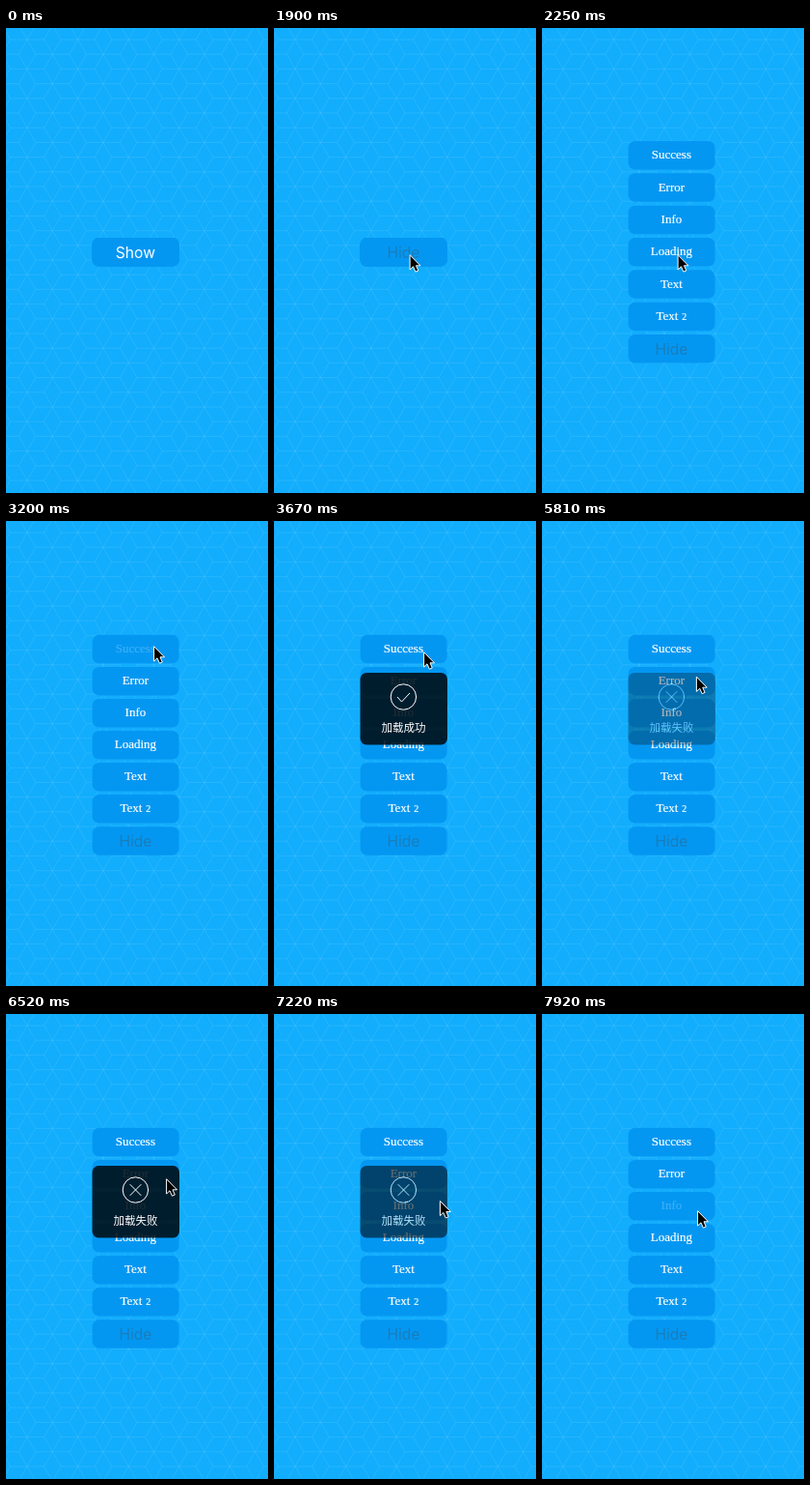
These frames come from a looping animation (272x481 px, 8000 ms). An HTML page:

```html
<!DOCTYPE html>
<html lang="en">
<head>
<meta charset="utf-8">
<title>Popup menu</title>
<style>
  html, body { margin: 0; width: 100%; height: 100%; overflow: hidden; background: #12adfd; }
  svg { display: block; width: 100%; height: 100%; }
  text { text-anchor: middle; fill: #fff; }
  .item { font: 13px "Liberation Serif", serif; stroke: #fff; stroke-width: 0.2; }
  .main { font: 15.6px Inter, sans-serif; }
  .note { font: 11.5px "Noto Sans CJK SC", "Noto Sans CJK", sans-serif; }
  .line { fill: none; stroke: #fff; stroke-width: 1; }
</style>
</head>
<body>
<svg id="stage" viewBox="0 0 272 481" xmlns="http://www.w3.org/2000/svg"></svg>
<script>
// Times are in seconds; the picture advances in even beats after a still opening.
const LOOP = 8, OPENING = 0.95, BEAT = 0.1181;
const PITCH = 33.05, TOP = 217, MID = 134.4, FADE = 0.35;
const stage = document.getElementById('stage');

function add(parent, tag, attrs, text) {
  const el = document.createElementNS('http://www.w3.org/2000/svg', tag);
  for (const key in attrs) el.setAttribute(key, attrs[key]);
  if (text) el.textContent = text;
  parent.append(el);
  return el;
}

// Six-ray stars on a staggered grid form the rhombus pattern.
function drawPattern() {
  const side = 17.53, row = 15.2;
  let d = '';
  for (let j = -2; j < 33; j++) {
    const shift = j % 2 ? 48.3 : 22;
    for (let k = -1; k < 6; k++) {
      const x = shift + k * side * 3, y = 12 + j * row;
      d += `M${x - side} ${y}h${2 * side}`;
      d += `M${x - side / 2} ${y - row}l${side} ${2 * row}`;
      d += `M${x + side / 2} ${y - row}l${-side} ${2 * row}`;
    }
  }
  add(stage, 'path', { d, fill: 'none', stroke: '#fff', 'stroke-opacity': 0.1, 'stroke-width': 0.9 });
}

function makeButton(name, kind) {
  const g = add(stage, 'g', {});
  add(g, 'rect', { x: 89.6, y: TOP, width: 90, height: 29.5, rx: 7, fill: '#0497f2' });
  const label = add(g, 'text', { x: MID, y: kind === 'main' ? 238 : 235.3, class: kind }, name);
  return { g, label };
}

function makeHud(message, icon, from, to) {
  const g = add(stage, 'g', {});
  add(g, 'rect', { x: 89.5, y: 157, width: 90.5, height: 74.5, rx: 6.5, fill: '#000d14', 'fill-opacity': 0.88 });
  add(g, 'circle', { cx: MID, cy: 182, r: 13.2, class: 'line' });
  add(g, 'path', { d: icon, class: 'line' });
  add(g, 'text', { x: MID, y: 218, class: 'note' }, message);
  return { g, from, to };
}

drawPattern();
const items = ['Success', 'Error', 'Info', 'Loading', 'Text', 'Text'].map(name => makeButton(name, 'item'));
// Old-style figure: a small digit at x-height.
add(items[5].label, 'tspan', { dx: 4, 'font-size': 10 }, '2');
const main = makeButton('Show', 'main');
const huds = [
  makeHud('加载成功', 'M128 182l4.5 5 8.5-9', 3.32, 4.63),
  makeHud('加载失败', 'M128.7 176.2l11.6 11.6m0-11.6l-11.6 11.6', 5.68, 7.11)
];
const cursor = add(stage, 'path', {
  d: 'M.6.7V16L4 12.8 6.4 18.2 9.3 17 7 11.8H11.5Z',
  fill: '#000', stroke: '#fff', 'stroke-width': 1, 'stroke-linejoin': 'round'
});

const entry = { x: 35, y: 242 };
const moves = [
  { from: 0.96, to: 1.67, x: 140.5, y: 234 },
  { from: 2.5, to: 3.2, x: 153, y: 129 },
  { from: 3.32, to: 3.56, x: 155, y: 135 },
  { from: 5.25, to: 6.03, x: 161, y: 167 },
  { from: 6.15, to: 6.5, x: 166, y: 170 },
  { from: 6.63, to: 6.98, x: 167, y: 190 },
  { from: 7.1, to: 7.45, x: 185, y: 200 },
  { from: 7.45, to: 7.9, x: 161, y: 203 }
];
const presses = [
  { button: main, from: 1.75, to: 1.85 },
  { button: items[0], from: 3.15, to: 3.4 },
  { button: items[1], from: 5.5, to: 5.75 },
  { button: items[2], from: 7.9, to: LOOP }
];

const ramp = (t, from, to) => Math.min(1, Math.max(0, (t - from) / (to - from)));
const smooth = u => u * u * (3 - 2 * u);

// Underdamped spring with a slight overshoot.
function spring(s) {
  return s <= 0 ? 0 : 1 - Math.exp(-7 * s) * (Math.cos(6.9 * s) + Math.sin(6.9 * s));
}

function pointer(t) {
  return moves.reduce((p, m) => {
    const u = smooth(ramp(t, m.from, m.to));
    return { x: p.x + (m.x - p.x) * u, y: p.y + (m.y - p.y) * u };
  }, entry);
}

function draw(time) {
  const beat = Math.floor((time % LOOP - OPENING) / BEAT);
  const t = 0.96 + beat * BEAT;

  const open = spring(t - 1.906);
  items.forEach((b, i) => b.g.setAttribute('transform', `translate(0 ${(i - 3) * PITCH * open})`));
  main.g.setAttribute('transform', `translate(0 ${3 * PITCH * open})`);

  const shown = t > 1.85;
  main.label.textContent = shown ? 'Hide' : 'Show';
  main.label.style.fill = shown ? '#1b7db8' : '#fff';

  for (const p of presses) p.button.label.setAttribute('opacity', t >= p.from && t < p.to ? 0.22 : 1);
  for (const h of huds) {
    h.g.setAttribute('opacity', ramp(t, h.from, h.from + FADE) - ramp(t, h.to, h.to + FADE));
  }

  const { x, y } = pointer(t);
  cursor.style.display = beat < 0 ? 'none' : '';
  cursor.setAttribute('transform', `translate(${x} ${y})`);
}

const start = performance.now();
function tick() {
  draw((performance.now() - start) / 1000);
  requestAnimationFrame(tick);
}
tick();
</script>
</body>
</html>
```
